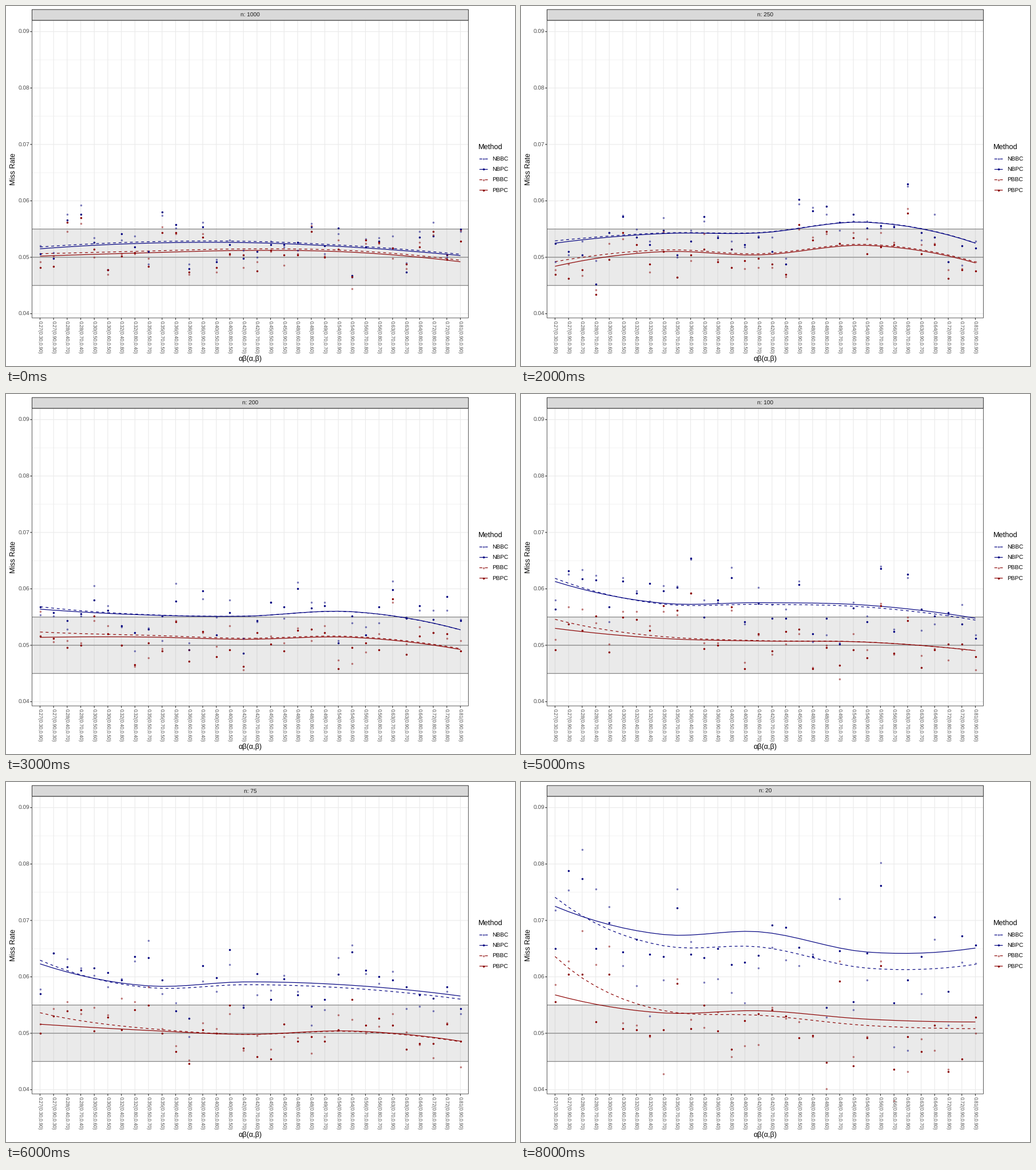
Animation of 890x629 px, one loop 9 s. Source, as a matplotlib script:

```python
import matplotlib.pyplot as plt
import numpy as np
from matplotlib.animation import FuncAnimation
from matplotlib.patches import Rectangle

W, H, DPI = 890, 629, 64
PT = 72 / DPI  # points per pixel
LEFT, RIGHT, TOP, BOTTOM = 45.5, 808.5, 25, 545
NAVY, RED = "#000080", "#8B0000"
GRID, GREY, DARK = "#EBEBEB", "#4D4D4D", "#333333"

plt.rcParams["font.family"] = "Liberation Sans"
plt.rcParams["text.hinting"] = "no_hinting"

# Methods in drawing order: name, colour, dashed, dot opacity
METHODS = [
    ("NBBC", NAVY, True, 0.5),
    ("NBPC", NAVY, False, 1),
    ("PBBC", RED, True, 0.5),
    ("PBPC", RED, False, 1),
]
SIZES = [1000, 500, 250, 200, 150, 100, 75, 50, 20]

# All pairs of paths whose product is at least 0.27
PAIRS = sorted((a * b, a, b) for a in range(1, 10) for b in range(1, 10) if a * b >= 27)
COUNT = len(PAIRS)
cats = np.arange(COUNT)
xs = 59.5 + cats * 735 / (COUNT - 1)

# Key points of the solid trends (NBPC, PBPC), in units of 0.0001
KNOTS = np.array([0, 8, 15, 23, 31])
TRENDS = {
    1000: ([515, 525, 526, 518, 503], [502, 508, 512, 509, 492]),
    250: ([525, 542, 543, 562, 525], [484, 510, 504, 521, 490]),
    150: ([603, 565, 560, 557, 530], [544, 519, 517, 507, 495]),
    75: ([623, 584, 591, 585, 566], [516, 505, 498, 504, 486]),
    50: ([673, 611, 615, 620, 584], [547, 497, 512, 509, 499]),
    20: ([725, 675, 680, 644, 651], [568, 536, 540, 525, 520]),
}


def to_y(rate):
    """Pixel row of a rate given in units of 0.0001."""
    return 439 - (np.asarray(rate) - 500) * 0.9857


def smooth(values):
    """Cubic Hermite curve through the knots, sampled at every category."""
    v = np.array(values, float)
    slope = np.gradient(v, KNOTS, edge_order=2)
    i = np.clip(np.searchsorted(KNOTS, cats, side="right") - 1, 0, len(KNOTS) - 2)
    h = KNOTS[i + 1] - KNOTS[i]
    t = (cats - KNOTS[i]) / h
    return ((1 + 2 * t) * (1 - t) ** 2 * v[i] + t * (1 - t) ** 2 * h * slope[i]
            + t * t * (3 - 2 * t) * v[i + 1] + t * t * (t - 1) * h * slope[i + 1])


def trend(n):
    """Key points for a sample size; sizes in between take their neighbours' mean."""
    if n in TRENDS:
        return np.array(TRENDS[n])
    above = min(k for k in TRENDS if k > n)
    below = max(k for k in TRENDS if k < n)
    return (trend(above) + trend(below)) / 2


def simulate(n):
    """Trend curves and scattered rates; the methods share most of the noise."""
    rng = np.random.default_rng(n)
    q = 20 / n
    blue, red = (smooth(row) for row in trend(n))
    # The corrected variants start higher and settle lower as samples shrink
    early = np.exp(-cats / 5)
    curves = np.array([
        blue + 3 + q * (45 * early - 32), blue,
        red + 3 + q * (80 * early - 15), red,
    ])
    shared = np.clip(rng.normal(size=COUNT), -1.7, 2.2) * (30 + 16 * q)
    gain = np.array([[1 + 0.6 * q], [1], [1 + 0.2 * q], [0.9]])
    jitter = rng.normal(size=curves.shape) * (6 + 18 * np.sqrt(q))
    return curves, 2 * np.round((curves + gain * shared + jitter) / 2)


STATES = [simulate(n) for n in SIZES]

fig = plt.figure(figsize=(W / DPI, H / DPI), dpi=DPI, facecolor="white")
ax = fig.add_axes([0, 0, 1, 1])
ax.set_xlim(0, W)
ax.set_ylim(H, 0)
ax.axis("off")


def line(x, y, color, width, z, dashed=False):
    style = (0, (4.1, 4.1)) if dashed else "-"
    return ax.plot(x, y, color=color, lw=width * PT, ls=style, zorder=z, snap=False,
                   solid_capstyle="butt", dash_capstyle="butt")[0]


def dots(x, y, color, alpha):
    return ax.plot(x, y, "o", color=color, alpha=alpha, ms=3.5 * PT, mew=0,
                   zorder=6, snap=False)[0]


def box(x0, y0, x1, y1, z, fill="none", edge="none", alpha=None):
    ax.add_patch(Rectangle((x0, y0), x1 - x0, y1 - y0, fc=fill, ec=edge,
                           lw=PT, alpha=alpha, zorder=z, snap=False))


def label(x, y, s, size, color="black", ha="center", rot=0):
    return ax.text(x, y, s, fontsize=size * PT, color=color, ha=ha, va="baseline",
                   rotation=rot, rotation_mode="anchor", zorder=9)


# Grid, axis ticks and tick labels
for rate in range(400, 901, 50):
    y = to_y(rate)
    major = rate % 100 == 0
    line([LEFT, RIGHT], [y, y], GRID, 1.2 if major else 0.6, 1)
    if major:
        line([LEFT - 3.2, LEFT], [y, y], DARK, 1.2, 7)
        label(41, y + 3.6, f"{rate / 10000:.2f}", 10.1, GREY, "right")
for x, (p, a, b) in zip(xs, PAIRS):
    line([x, x], [TOP, BOTTOM], GRID, 1.2, 1)
    line([x, x], [BOTTOM, BOTTOM + 3.2], DARK, 1.2, 7)
    label(x - 3, 550.5, f"{p / 100:.2f}({a / 10:.2f},{b / 10:.2f})", 8.5, GREY, "left", 270)

# Tolerance band
box(LEFT, to_y(550), RIGHT, to_y(450), 2, fill="#999999", alpha=0.2)
for rate in (450, 500, 550):
    line([LEFT, RIGHT], [to_y(rate)] * 2, "#7A7A7A", 1.1, 3)

# Frame, strip and titles
box(LEFT, TOP, RIGHT, BOTTOM, 7, edge="#5A5A5A")
box(LEFT, 6.2, RIGHT, TOP, 8, fill="#D9D9D9", edge=DARK)
title = label(427, 19.2, "", 10.1, "#1A1A1A")
label(15.7, 285, "Miss Rate", 12.6, rot=90)
label(427, 620.5, "αβ(α,β)", 12.6)

# Legend
label(826, 250.3, "Method", 12.7, ha="left")
for k, (name, color, dashed, alpha) in enumerate(METHODS):
    y = 267.3 + 18.15 * k
    line([827.8, 842.4], [y, y], color, 1.2, 5, dashed)
    dots([835.1], [y], color, alpha)
    label(850.3, y + 3.7, name, 10.1, ha="left")

curve_art = [line(xs, xs, color, 1.2, 5, dashed) for _, color, dashed, _ in METHODS]
dot_art = [dots(xs, xs, color, alpha) for _, color, _, alpha in METHODS]


def draw(i):
    curves, rates = STATES[i]
    title.set_text(f"n: {SIZES[i]}")
    for art, values in zip(curve_art + dot_art, [*curves, *rates]):
        art.set_ydata(to_y(values))
    return [title, *curve_art, *dot_art]


anim = FuncAnimation(fig, draw, frames=len(SIZES), interval=1000, repeat=True, repeat_delay=0)
plt.show()
```
